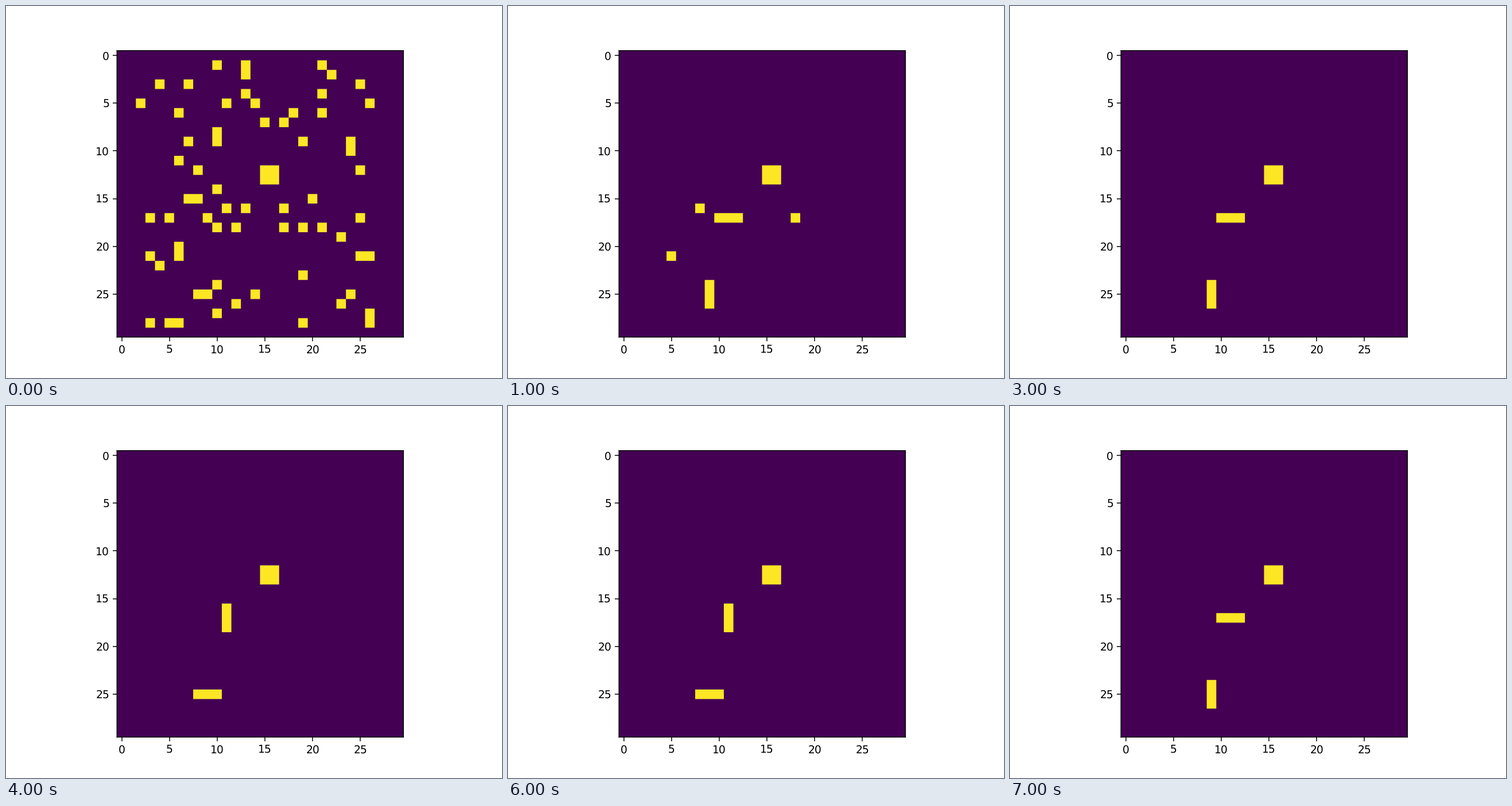
Write a matplotlib script that moves like this. It is 864 px wide and 648 px high and loops after 8 s.

```python
import matplotlib.pyplot as plt
import numpy as np
from matplotlib.animation import FuncAnimation

SIZE = 30
STEPS = 8
LIVE_CELLS = 70
DETAIL = 17  # samples per cell, so that cell edges fall between pixels

# (row, column) of the cells that grow into the lasting shapes
BLOCK = [(12, 15), (12, 16), (13, 15)]
UPPER_BLINKER = [(16, 11), (16, 13), (17, 9), (18, 10), (18, 12)]
LOWER_BLINKER = [(24, 10), (25, 8), (25, 9), (27, 10)]
SPARKS = [(15, 7), (15, 8), (16, 17), (18, 17), (18, 19),
          (20, 6), (21, 6), (22, 4)]


def next_board(board):
    """One generation of Conway's Game of Life with dead borders."""
    padded = np.pad(board, 1)
    around = sum(
        padded[r:r + SIZE, c:c + SIZE] for r in range(3) for c in range(3)
    ) - board
    return ((around == 3) | ((board == 1) & (around == 2))).astype(int)


def first_board():
    """Lasting shapes, plus scattered cells that die without a trace."""
    rng = np.random.default_rng(4)
    board = np.zeros((SIZE, SIZE), dtype=int)
    for cell in BLOCK + UPPER_BLINKER + LOWER_BLINKER + SPARKS:
        board[cell] = 1
    future = next_board(board)
    for _ in range(5000):
        if board.sum() == LIVE_CELLS:
            break
        trial = board.copy()
        trial[rng.integers(1, 29), rng.integers(1, 27)] = 1
        if np.array_equal(next_board(trial), future):
            board = trial
    return board


def enlarge(board):
    return np.kron(board, np.ones((DETAIL, DETAIL)))


boards = [first_board()]
while len(boards) < STEPS:
    boards.append(next_board(boards[-1]))

plt.rcParams.update({"path.snap": False, "text.hinting": "no_hinting"})
fig, ax = plt.subplots(figsize=(6.4, 4.8), dpi=135)
ax.set_facecolor(plt.get_cmap("viridis")(0))
image = ax.imshow(enlarge(boards[0]), cmap="viridis", vmin=0, vmax=1,
                  extent=(-0.5, SIZE - 0.5, SIZE - 0.5, -0.5),
                  interpolation="bilinear", interpolation_stage="rgba")


def update(step):
    image.set_data(enlarge(boards[step]))
    return [image]


anim = FuncAnimation(fig, update, frames=STEPS, interval=1000, repeat=True)
plt.show()
```
